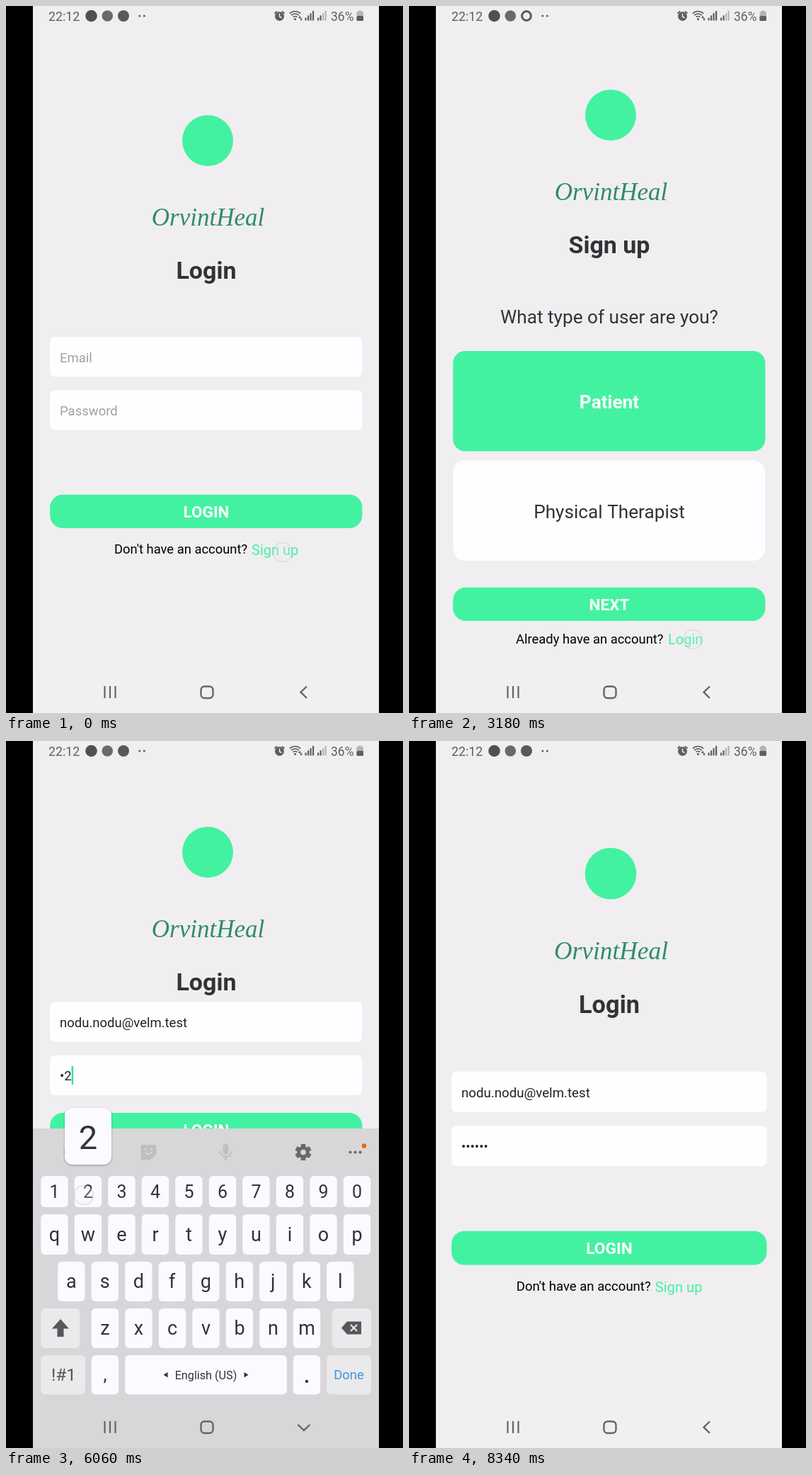
Write an HTML page with a canvas that moves like this. It is 561x998 px and loops after 8.4 s.

```html
<!DOCTYPE html>
<html lang="en">
<head>
<meta charset="utf-8">
<title>Login flow</title>
<style>
html, body { margin: 0; width: 100%; height: 100%; overflow: hidden; background: #000; }
canvas { display: block; width: 100vw; height: 100vh; }
</style>
</head>
<body>
<canvas id="stage" width="561" height="998"></canvas>
<script>
const ctx = document.getElementById('stage').getContext('2d');
const LOOP = 8400, STEP = 60;
const BG = '#f0eef1', GREEN = '#43f2a1', INK = '#333336', GREY = '#5e5e60', BOARD = '#d8d6d9', KEY = '#fbfaff';
const MID = 282.5, KB_TOP = 547, NAV_TOP = 939;
const EMAIL = 'nodu.nodu@velm.test', PIN = '123123';
const EMAIL_TIMES = [4200, 4380, 4680, 4860], FILL_AT = 5100;
const PIN_TIMES = [5700, 6000, 6240, 6480, 6720, 6960], MASK_AT = 7860;
const FOCUS = { email: 3840, pin: 5400, end: 7620 };
const ROWS = [
  { keys: '1234567890', x: 68.5, y: 614, h: 44, size: 25 },
  { keys: 'qwertyuiop', x: 68.5, y: 668, h: 57, size: 27 },
  { keys: 'asdfghjkl', x: 92.3, y: 735, h: 56, size: 27 },
  { keys: 'zxcvbnm', x: 140, y: 801, h: 56, size: 27 }
];

const clamp = v => Math.max(0, Math.min(1, v));
const mix = (a, b, p) => a + (b - a) * p;
const within = (t, a, b) => t >= a && t < b;

function box(x, y, w, h, r, color) {
  ctx.fillStyle = color;
  ctx.beginPath();
  ctx.roundRect(x, y, w, h, r);
  ctx.fill();
}

function disc(x, y, r, color) {
  ctx.fillStyle = color;
  ctx.beginPath();
  ctx.arc(x, y, r, 0, 7);
  ctx.fill();
}

function ring(x, y, r, color, width) {
  ctx.strokeStyle = color;
  ctx.lineWidth = width;
  ctx.beginPath();
  ctx.arc(x, y, r, 0, 7);
  ctx.stroke();
}

// Strokes a polyline given as x, y pairs
function line(pts, color, width) {
  ctx.strokeStyle = color;
  ctx.lineWidth = width;
  ctx.beginPath();
  for (let i = 0; i < pts.length; i += 2) ctx.lineTo(pts[i], pts[i + 1]);
  ctx.stroke();
}

function shape(pts, color) {
  ctx.fillStyle = color;
  ctx.beginPath();
  for (let i = 0; i < pts.length; i += 2) ctx.lineTo(pts[i], pts[i + 1]);
  ctx.fill();
}

function text(s, x, y, size, color, align = 'left', weight = 400) {
  ctx.font = `${weight} ${size}px Roboto, sans-serif`;
  ctx.textAlign = align;
  ctx.fillStyle = color;
  ctx.fillText(s, x, y);
}

function brand(dy) {
  disc(285, 190 + dy, 36, GREEN);
  ctx.font = 'italic 35px "Liberation Serif", serif';
  ctx.textAlign = 'center';
  ctx.fillStyle = '#2e8b6c';
  ctx.fillText('OrvintHeal', 285.5, 310 + dy);
}

function button(label, y) {
  box(62.2, y, 441.2, 47.3, 18, GREEN);
  text(label, 283, y + 32, 22.5, '#fff', 'center', 700);
}

function emailText(t) {
  return t >= FILL_AT ? EMAIL : EMAIL.slice(0, EMAIL_TIMES.filter(k => t >= k).length);
}

function pinText(t) {
  const n = PIN_TIMES.filter(k => t >= k).length;
  if (!n) return '';
  return '•'.repeat(n - 1) + (t < MASK_AT ? PIN[n - 1] : '•');
}

function caretOn(t) {
  const marks = [FOCUS.email, ...EMAIL_TIMES, FILL_AT, FOCUS.pin, ...PIN_TIMES];
  const last = Math.max(...marks.filter(k => k <= t));
  return Math.floor((t - last) / 500) % 2 === 0;
}

function field(y, value, hint, focused, t) {
  box(62.2, y, 441.2, 56.5, 7, '#fefdff');
  text(value || hint, 76, y + 35.5, 18.5, value ? '#222' : '#a0a0a2');
  if (focused && caretOn(t)) {
    const w = value ? ctx.measureText(value).width : 0;
    box(76 + w, y + 15.5, 2.5, 26, 0, '#35dfa2');
  }
}

function loginScreen(t) {
  const typing = within(t, FOCUS.email, FOCUS.end);
  const lift = typing ? -99 : 0, head = typing ? -33 : 0;
  brand(head);
  text('Login', 283, 385 + head, 34, INK, 'center', 700);
  field(467 + lift, emailText(t), 'Email', typing && t < FOCUS.pin, t);
  field(542.5 + lift, pinText(t), 'Password', typing && t >= FOCUS.pin, t);
  if (typing) {
    button('LOGIN', 525);
  } else {
    button('LOGIN', 689.7);
    text("Don't have an account?", 153, 773, 18.4, '#000');
    text('Sign up', 347, 775, 20, GREEN);
  }
}

function choice(label, y, on) {
  box(62.2, y, 441.2, 141.5, 17, on ? GREEN : '#fefdff');
  text(label, 283, y + 81, 26.2, on ? '#fff' : INK, 'center', on ? 700 : 400);
}

function signupScreen(t) {
  const patient = within(t, 780, 1200) || t >= 1860;
  brand(-36);
  text('Sign up', 283, 349, 34, INK, 'center', 700);
  text('What type of user are you?', 283, 448, 26.2, INK, 'center');
  choice('Patient', 487, patient);
  choice('Physical Therapist', 641.5, within(t, 1200, 1860));
  button('NEXT', 820.8);
  text('Already have an account?', 151, 900, 18.4, '#000');
  text('Login', 366, 901, 20, GREEN);
}

// Paints one screen scaled about the middle of the app area
function card(draw, t, scale, alpha) {
  if (alpha <= 0) return;
  ctx.save();
  ctx.beginPath();
  ctx.rect(38, 28, 489, NAV_TOP - 28);
  ctx.clip();
  ctx.translate(MID, 484);
  ctx.scale(scale, scale);
  ctx.translate(-MID, -484);
  ctx.globalAlpha = alpha;
  box(38, 28, 489, NAV_TOP - 28, 0, BG);
  draw(t);
  ctx.restore();
}

const slide = (t, start) => 1 - (1 - clamp((t - start) / 400)) ** 4;
const backAlpha = p => 1 - clamp((p - 0.2075) / 0.7925);
const frontAlpha = p => clamp((p - 0.75) / 0.125);

function app(t) {
  if (t < 450) {
    const p = slide(t, 20);
    card(loginScreen, t, mix(1, 1.075, p), backAlpha(p));
    card(signupScreen, t, mix(0.85, 1, p), frontAlpha(p));
  } else if (t < 3200) {
    card(signupScreen, t, 1, 1);
  } else if (t < 3600) {
    const p = 1 - slide(t, 3190);
    card(loginScreen, t, mix(1, 1.075, p), backAlpha(p));
    card(signupScreen, t, mix(0.925, 1, p), frontAlpha(p));
  } else {
    card(loginScreen, t, mix(1, 1.075, slide(t, 8326)), 1);
  }
}

function statusBar(t) {
  text('22:12', 60, 20.5, 17.8, GREY);
  disc(120.5, 14, 8.3, '#505052');
  disc(143.3, 14, 7.8, '#69696b');
  const blink = Math.floor(t / 574 + 0.3) % 2;
  if (blink) ring(166, 14, 6.4, '#59595b', 3);
  else disc(166, 14, 8, '#59595b');
  disc(188.8, 14, 1.5, GREY);
  disc(195.3, 14, 1.5, GREY);

  disc(386.5, 14.5, 6.5, GREY);
  line([386.5, 10.5, 386.5, 15, 389.5, 16.5], BG, 1.4);
  line([379.5, 10.5, 383, 7.5], GREY, 2);
  line([390, 7.5, 393.5, 10.5], GREY, 2);
  ctx.strokeStyle = GREY;
  ctx.lineWidth = 1.7;
  for (const r of [4, 7.5, 11]) {
    ctx.beginPath();
    ctx.arc(408.5, 18.5, r, Math.PI * 1.25, Math.PI * 1.75);
    ctx.stroke();
  }
  disc(408.5, 18.5, 1.6, GREY);
  shape([413, 17, 415, 13.5, 417, 17], GREY);
  shape([415, 17.5, 417, 21, 419, 17.5], GREY);
  for (let i = 0; i < 4; i++) {
    const h = 4 + i * 3.2;
    box(422.5 + i * 3.5, 20.5 - h, 2.2, h, 0, GREY);
    box(440 + i * 3.5, 20.5 - h, 2.2, h, 0, i < 2 ? GREY : '#b4b4b6');
  }
  text('36%', 459, 20.5, 17.5, GREY);
  box(498, 6.5, 4.5, 2, 0, '#b4b4b6');
  box(495.5, 8, 9.5, 13, 1.5, '#b4b4b6');
  box(495.5, 14, 9.5, 7, 1.5, GREY);
}

function navBar(t, boardUp) {
  box(38, NAV_TOP, 489, 998 - NAV_TOP, 0, boardUp ? BOARD : '#f1eff2');
  if (within(t, 7440, 7620)) box(347, 941, 144.5, 55.5, 28, '#c7c6c8');
  const ink = '#656568';
  for (const x of [139.5, 147, 154.5]) line([x, 960, x, 977], ink, 2.2);
  ctx.strokeStyle = ink;
  ctx.lineWidth = 2.4;
  ctx.beginPath();
  ctx.roundRect(275.5, 960.5, 17, 16.5, 5);
  ctx.stroke();
  const down = within(t, FOCUS.email, 7440);
  line(down ? [412.5, 965, 421, 973, 429.5, 965] : [425, 960.5, 416.5, 968.7, 425, 977], ink, 2.4);
}

function smiley(x, color) {
  disc(x, 580.5, 11, color);
  disc(x - 4, 577.5, 1.7, BOARD);
  disc(x + 4, 577.5, 1.7, BOARD);
  ctx.fillStyle = BOARD;
  ctx.beginPath();
  ctx.arc(x, 581.5, 6, 0.15, Math.PI - 0.15);
  ctx.fill();
}

function sticker(x, color) {
  box(x - 11, 570, 22, 21.5, 3, color);
  shape([x + 2, 592, x + 12, 592, x + 12, 582], BOARD);
  shape([x + 2, 590, x + 2, 583, x + 10, 583], color);
  disc(x - 4, 576, 1.6, BOARD);
  disc(x + 4, 576, 1.6, BOARD);
  ctx.strokeStyle = BOARD;
  ctx.lineWidth = 1.8;
  ctx.beginPath();
  ctx.arc(x, 578, 5, 0.4, 2.7);
  ctx.stroke();
}

function mic(x, color) {
  box(x - 3.8, 568.5, 7.6, 15, 4, color);
  ctx.strokeStyle = color;
  ctx.lineWidth = 2;
  ctx.beginPath();
  ctx.arc(x, 579, 8, 0, Math.PI);
  ctx.stroke();
  line([x, 587, x, 592.5], color, 2.5);
}

function gear(x, color) {
  for (let i = 0; i < 6; i++) {
    const a = i * Math.PI / 3 + Math.PI / 6, c = Math.cos(a), s = Math.sin(a);
    line([x + c * 6, 580.5 + s * 6, x + c * 11.5, 580.5 + s * 11.5], color, 6.5);
  }
  ring(x, 580.5, 6.3, color, 5);
}

function toolbar(secret) {
  const ink = '#69696c', dim = secret ? '#bfbec1' : ink;
  if (!secret) {
    ring(69, 580.5, 10.5, ink, 2);
    line([57, 589, 63, 592], BOARD, 5);
    line([75, 569, 81, 572], BOARD, 5);
    shape([60, 569, 66, 569, 66, 575], ink);
    shape([78, 592, 72, 592, 72, 586], ink);
    text('T', 69, 586.5, 16, ink, 'center', 700);
    line([95, 569, 95, 592], '#bdbcbf', 1.2);
  }
  smiley(secret ? 92.5 : 142.5, dim);
  sticker(secret ? 201.5 : 237.5, dim);
  mic(secret ? 310.5 : 332.5, dim);
  gear(secret ? 420 : 427.5, ink);
  for (const x of [486.5, 493.5, 500.5]) disc(x, 580.5, 2.1, ink);
  disc(506, 571.5, 3.2, '#ea6410');
}

function keyboard(secret) {
  box(38, KB_TOP, 489, 460, 0, BOARD);
  toolbar(secret);
  for (const row of ROWS) {
    [...row.keys].forEach((ch, i) => {
      const x = row.x + i * 47.5;
      box(x - 19.2, row.y, 38.4, row.h, 6, KEY);
      text(ch, x, row.y + row.h / 2 + 9.2, row.size, INK, 'center');
    });
  }
  const soft = '#eae9ec';
  box(49.3, 801, 55, 56, 6, soft);
  shape([77, 816, 89, 829.5, 81.5, 829.5, 81.5, 841, 72.5, 841, 72.5, 829.5, 65, 829.5], '#57575a');
  box(460.8, 801, 55, 56, 6, soft);
  shape([474, 828.5, 482, 819.5, 502, 819.5, 502, 837.5, 482, 837.5], '#57575a');
  line([487, 824, 496, 833], soft, 2.2);
  line([496, 824, 487, 833], soft, 2.2);

  box(49.3, 867, 62.5, 55.5, 6, soft);
  text('!#1', 81.5, 903, 24.5, '#555558', 'center');
  box(120.8, 867, 38.4, 55.5, 6, KEY);
  text(',', 140, 902.5, 26, INK, 'center');
  box(168.3, 867, 228.5, 55.5, 6, KEY);
  text('English (US)', 282.5, 900.5, 16.2, INK, 'center');
  shape([222.5, 894.7, 228.5, 891, 228.5, 898.4], INK);
  shape([342.5, 894.7, 336.5, 891, 336.5, 898.4], INK);
  box(405.8, 867, 38.4, 55.5, 6, KEY);
  text('.', 425, 905.5, 28, INK, 'center', 700);
  box(453.3, 867, 62.5, 55.5, 6, soft);
  text('Done', 484.5, 901, 18.5, '#3f97de', 'center');
}

function keySpot(ch) {
  const row = ROWS.find(r => r.keys.includes(ch));
  return { x: row.x + row.keys.indexOf(ch) * 47.5, top: row.y, y: row.y + row.h / 2 };
}

function popup(ch) {
  const k = keySpot(ch);
  const x = Math.max(82, Math.min(483, k.x)), y = k.top - 96;
  ctx.save();
  ctx.shadowColor = 'rgba(0,0,0,.3)';
  ctx.shadowBlur = 3;
  ctx.shadowOffsetY = 1;
  box(x - 33, y, 66, 80, 11, KEY);
  ctx.restore();
  text(ch, x, y + 58, 47, INK, 'center');
}

const strokes = [
  ...EMAIL_TIMES.map((at, i) => ({ at, ch: EMAIL[i] })),
  ...PIN_TIMES.map((at, i) => ({ at, ch: PIN[i] }))
];

// x, y, pressed from, released at
const touches = [
  [391, 771, -120, -70], [300, 575, 720, 820], [404, 728, 1140, 1280],
  [380, 575, 1800, 1940], [401, 894, 3000, 3110], [220, 498, 3720, 3800],
  [282, 580, 5040, 5110], [220, 474, 5310, 5390], [422, 980, 7420, 7480],
  [328, 720, 7900, 8000],
  ...strokes.map(s => {
    const k = keySpot(s.ch);
    return [k.x - 6, k.y + 5, s.at - 60, s.at];
  })
];

function touchDots(t) {
  for (const [x, y, from, to] of touches) {
    if (t < from) continue;
    ctx.globalAlpha = 1 - clamp((t - to) / 110);
    if (ctx.globalAlpha > 0) {
      disc(x, y, 13.5, 'rgba(240,240,242,.5)');
      ring(x, y, 13.5, 'rgba(178,182,182,.75)', 1.6);
    }
  }
  ctx.globalAlpha = 1;
}

function boardOffset(t) {
  if (t < 7500) return 392 * (1 - clamp((t - 3780) / 250)) ** 3;
  return 392 * clamp((t - 7530) / 150) ** 2;
}

function draw(t) {
  box(0, 0, 561, 998, 0, '#000');
  box(38, 0, 489, 998, 0, BG);
  app(t);
  statusBar(t);
  const boardUp = within(t, FOCUS.email, 7680);
  if (boardUp) {
    if (t < FOCUS.end) box(38, KB_TOP, 489, NAV_TOP - KB_TOP, 0, '#fff');
    ctx.save();
    ctx.translate(0, boardOffset(t));
    keyboard(t >= FOCUS.pin);
    ctx.restore();
  }
  navBar(t, boardUp);
  for (const s of strokes) if (within(t, s.at - 30, s.at + 90)) popup(s.ch);
  touchDots(t);
}

const start = performance.now();
function tick() {
  const t = (performance.now() - start) % LOOP;
  draw(Math.floor(t / STEP) * STEP);
  requestAnimationFrame(tick);
}
tick();
</script>
</body>
</html>
```
